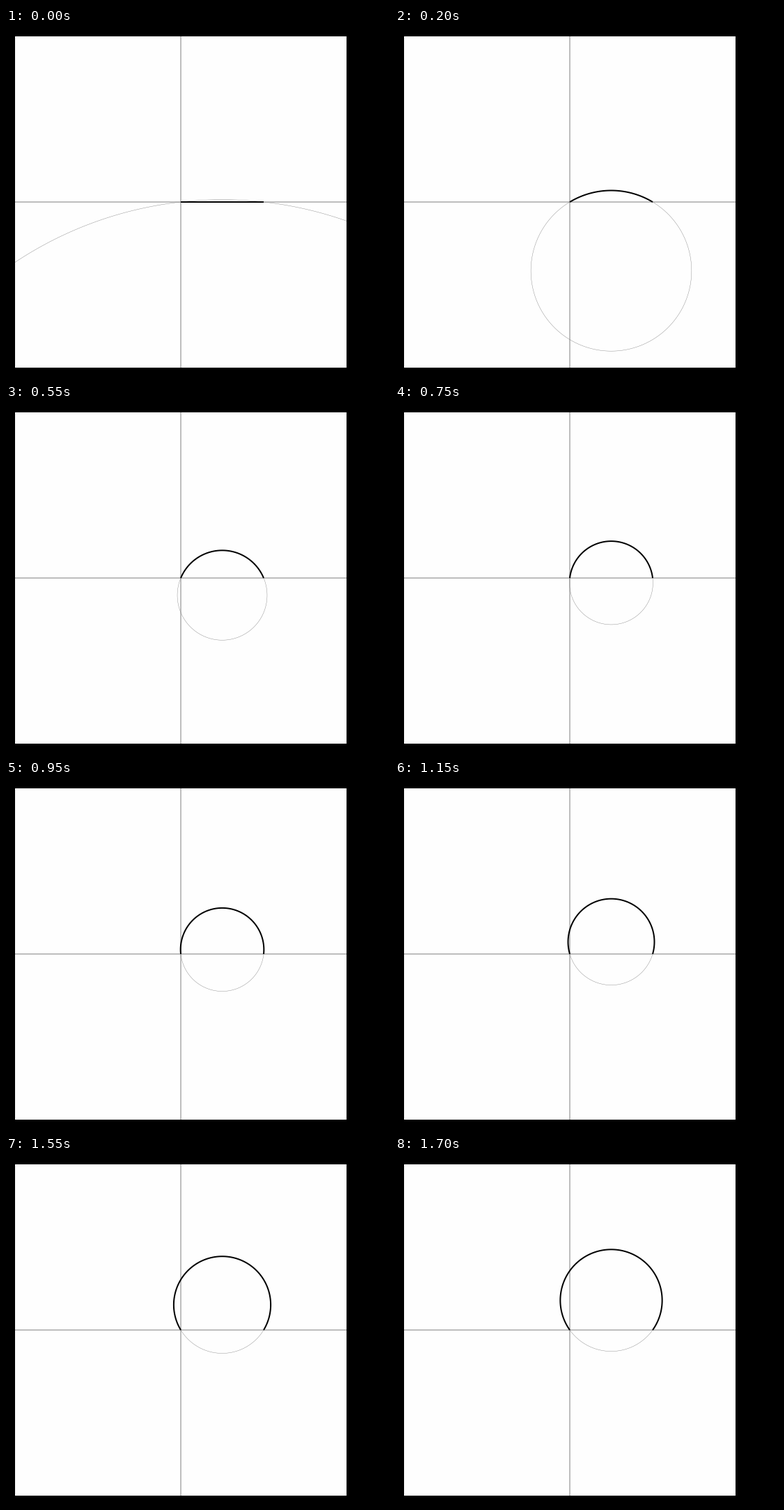
A matplotlib script for the animation above (1.75 s loop, 550 px wide and 500 px high).

```python
import numpy as np
import matplotlib.pyplot as plt
from matplotlib.animation import FuncAnimation
from matplotlib.patches import Rectangle

W, H, DPI = 550, 500, 100
FRAMES, INTERVAL = 35, 50
LEFT, TOP, SIDE = 13, 12, 476
OX, OY = LEFT + SIDE / 2, TOP + SIDE / 2   # origin of the cross
CHORD = SIDE / 4
PX = 72 / DPI                              # one pixel in points

plt.rcParams["path.simplify"] = False
fig = plt.figure(figsize=(W / DPI, H / DPI), dpi=DPI, facecolor="black")
ax = fig.add_axes([0, 0, 1, 1])
ax.set_xlim(0, W)
ax.set_ylim(H, 0)
ax.axis("off")

panel = Rectangle((LEFT, TOP), SIDE, SIDE, fc="#fefefe", ec="none", zorder=0)
ax.add_patch(panel)


def stroke(x, y, width, color, z):
    line, = ax.plot(x, y, lw=width * PX, color=color, zorder=z,
                    solid_capstyle="butt", solid_joinstyle="round", snap=False)
    line.set_clip_path(panel)
    return line


stroke([LEFT, LEFT + SIDE], [OY, OY], 1, "#808080", 1)
stroke([OX, OX], [TOP, TOP + SIDE], 1, "#808080", 1)
circle = stroke([], [], 0.4, "#808080", 2)
arc = stroke([], [], 2, "black", 3)


def points(r, cy, angle):
    """Circle points, angles measured from the top."""
    return OX + CHORD / 2 + r * np.sin(angle), cy - r * np.cos(angle)


def update(k):
    half = CHORD / 2
    rise = CHORD * (k + 1) / (FRAMES + 1)
    r = (half ** 2 + rise ** 2) / (2 * rise)
    cy = OY - rise + r
    circle.set_data(*points(r, cy, np.linspace(-np.pi, np.pi, 721)))
    if k == 0:
        arc.set_data([OX, OX + CHORD], [OY, OY])
    else:
        end = 2 * np.arctan2(rise, half)
        arc.set_data(*points(r, cy, np.linspace(-end, end, 241)))
    return circle, arc


anim = FuncAnimation(fig, update, frames=FRAMES, interval=INTERVAL,
                     init_func=lambda: update(0), repeat=True, repeat_delay=0)
plt.show()
```
